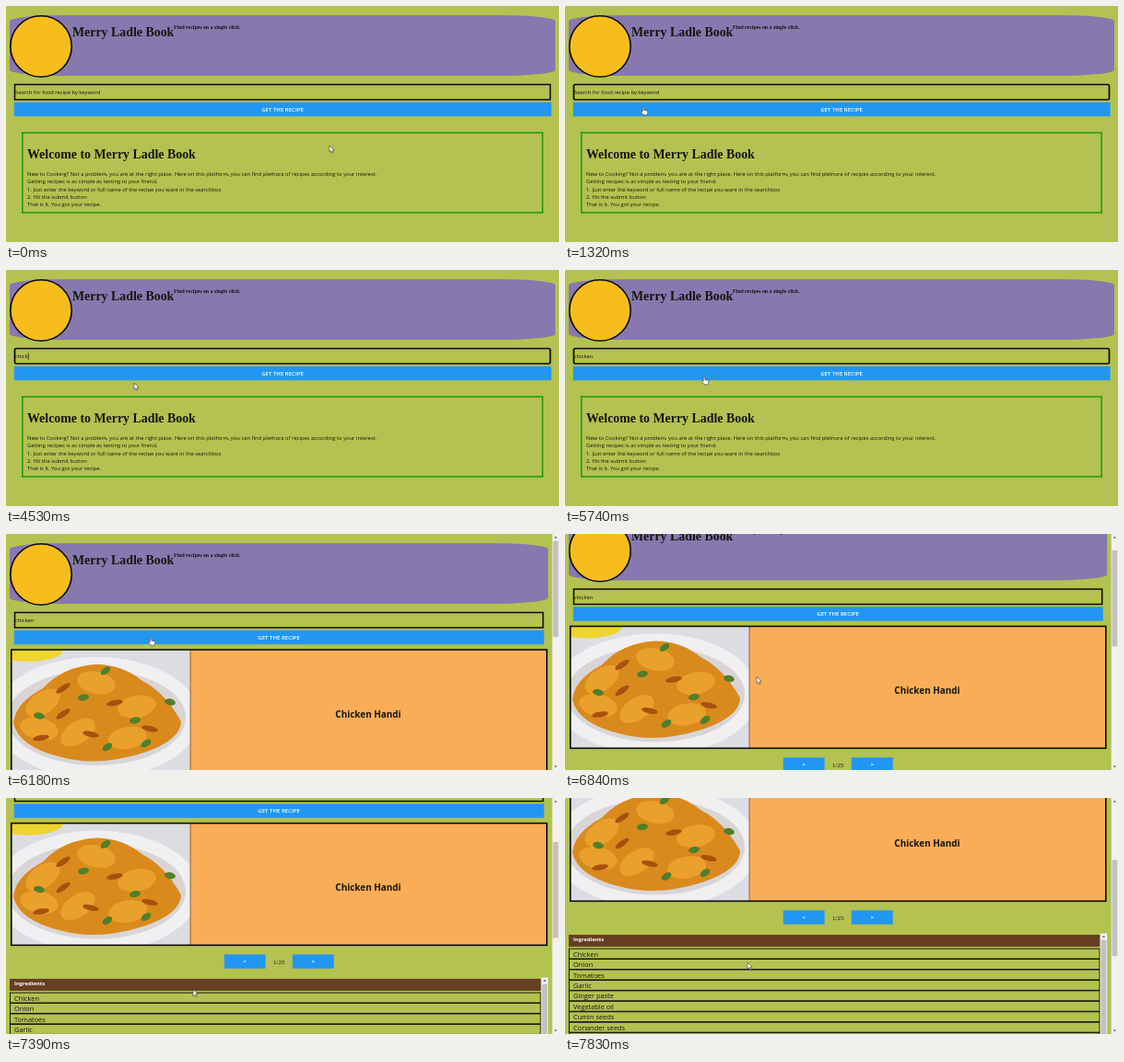
Write an HTML page that moves like this. It is 600 px wide and 257 px high and loops after 8 s.

```html
<!DOCTYPE html>
<html lang="en">
<head>
<meta charset="utf-8">
<title>Recipe search</title>
<style>
  html, body { margin: 0; width: 100%; height: 100%; overflow: hidden; background: #b3c250; }
  svg { display: block; width: 100vw; height: 100vh; }
  text { font-family: "Open Sans", "Noto Sans", sans-serif; font-size: 5.83px; fill: #151510; white-space: pre; }
  .serif { font-family: "Liberation Serif", "Noto Serif", serif; }
  .bold { font-weight: 700; }
  .mid { text-anchor: middle; }
  .white { fill: #fff; }
  .btn { fill: #2196f3; stroke: #4d9fca; stroke-width: .6; }
  .line { fill: none; stroke: #0a0a08; }
</style>
</head>
<body>
<svg viewBox="0 0 600 257" preserveAspectRatio="none">
  <g id="page">
    <rect id="header" x="4" y="10" height="66" rx="59" ry="6.6" fill="#8878b0"/>
    <circle cx="38" cy="44" r="33.2" fill="#f6bd1c" stroke="#0a0a08" stroke-width="1.6"/>
    <text class="serif bold" x="72" y="32.5" style="font-size:13.9px">Merry Ladle Book</text>
    <text class="serif bold" x="182" y="25.2" style="font-size:5.84px">Find recipes on a single click.</text>

    <rect id="field" class="line" x="9.5" y="85.5" height="16.5"/>
    <text id="query" x="10" y="96.2"></text>
    <rect id="caret" y="90.3" width=".7" height="7.4" fill="#0a0a08"/>
    <rect id="submit" class="btn" x="9" y="105" height="15"/>
    <text id="label" class="mid white" y="114.8" style="font-size:6.05px;font-weight:600">GET THE RECIPE</text>

    <g id="welcome">
      <rect x="17.8" y="138" width="564.4" height="87" fill="none" stroke="#1d9612" stroke-width="1.5"/>
      <text class="serif bold" x="23" y="165.5" style="font-size:13.9px">Welcome to Merry Ladle Book</text>
    </g>

    <g id="results">
      <rect x="5.8" y="126" width="581" height="132.8" fill="#faad58"/>
      <svg x="6" y="126" width="194" height="132.5" viewBox="6 126 194 132.5">
        <rect x="6" y="126" width="194" height="133" fill="#dcdde2"/>
        <ellipse cx="24" cy="126" rx="38" ry="13" fill="#efd52f"/>
        <ellipse cx="98" cy="200" rx="112" ry="66" fill="#f0eff1"/>
        <ellipse cx="98" cy="200" rx="97" ry="52" fill="#d9d5d6"/>
        <path fill="#d98a1c" d="M8 206Q10 184 40 168Q62 144 98 142Q126 142 148 160Q172 172 190 204Q190 224 150 238Q100 254 60 243Q14 232 8 206Z"/>
        <g id="pieces" fill="#eaa12c"></g>
        <g id="sears" fill="#a9500f"></g>
        <g id="leaves" fill="#4f7f2c"></g>
      </svg>
      <path d="M200 126V259" stroke="#3c2a16" stroke-width=".6"/>
      <rect class="line" x="5.8" y="126" width="581" height="132.8" stroke-width="1.6"/>
      <text class="mid bold" x="393" y="199.6" style="font-size:9.93px">Chicken Handi</text>

      <rect class="btn" x="237" y="269" width="44.3" height="15"/>
      <rect class="btn" x="311" y="269" width="44.6" height="15"/>
      <text class="mid white bold" x="259" y="278.6">&lt;</text>
      <text class="mid white bold" x="333.5" y="278.6">&gt;</text>
      <text class="serif" x="290" y="279" style="font-size:7px">1/25</text>

      <rect x="4" y="295.4" width="576.5" height="13" fill="#653f20"/>
      <text class="white bold" x="9" y="302.9">Ingredients</text>
      <g id="rows"></g>
      <rect x="580.7" y="294" width="7.5" height="130" fill="#f1f1f1"/>
      <rect x="581.6" y="301" width="5.7" height="123" fill="#c1c1c1"/>
      <path d="M582.8 298.2h3.4l-1.7-2z" fill="#555"/>
    </g>
  </g>

  <g id="bar">
    <rect x="592.7" width="7.3" height="257" fill="#f1f1f1"/>
    <rect id="thumb" x="593.5" width="5.8" height="104.5" fill="#c1c1c1"/>
    <path d="M594.8 4.6h3.2l-1.6-2zM594.8 252.6h3.2l-1.6 2z" fill="#555"/>
  </g>

  <g id="mouse">
    <path id="arrow" d="M0 0V7.2L1.7 5.7L2.8 8.2L4 7.7L2.9 5.2H5.2Z" fill="#fff" stroke="#333" stroke-width=".6"/>
    <path id="hand" d="M-.8 .6Q0-.4.8.6V3.4L4.4 4.2Q5 4.6 4.7 6.2L4 8.8H.2L-2.6 5.4Q-2.4 4.3-.8 5.2Z" fill="#fff" stroke="#333" stroke-width=".6"/>
    <path id="beam" d="M-1.4-3.6H1.4M0-3.6V3.6M-1.4 3.6H1.4" fill="none" stroke="#222" stroke-width=".7"/>
  </g>
</svg>
<script>
const LOOP = 8000, STEP = 110, REST = 1320, RESUME = 2440;
const FOCUS = 990, BLUR = 5850, RESULTS = 6070;
const KEYS = [3540, 3760, 4090, 4200, 4420, 4750, 4860];
const SCROLL = [[6620, 0], [6840, 25.5], [7390, 98.5], [7830, 146.5]];
const MOUSE = [
  [0, 351, 152], [880, 84, 93], [1210, 84, 93], [1320, 85, 110],
  [2330, 85, 110], [2550, 139, 123], [5520, 139, 123], [5850, 157, 112.5],
  [6400, 157, 112.5], [6730, 208, 155.5], [6840, 208, 155.5], [7390, 203, 208.5], [7830, 198, 179]
];
const INTRO = [
  "New to Cooking? Not a problem, you are at the right place. Here on this platform, you can find plethora of recipes according to your interest.",
  "Getting recipes is as simple as texting to your friend.",
  "1. Just enter the keyword or full name of the recipe you want in the searchbox",
  "2. Hit the submit button",
  "That is it. You got your recipe."
];
const FOODS = ["Chicken", "Onion", "Tomatoes", "Garlic", "Ginger paste", "Vegetable oil", "Cumin seeds", "Coriander seeds", ""];

const $ = id => document.getElementById(id);
const set = (id, attrs) => { for (const k in attrs) $(id).setAttribute(k, attrs[k]); };
const show = (id, on) => { $(id).style.display = on ? "" : "none"; };

function add(parent, tag, attrs, text = "") {
  const el = document.createElementNS("http://www.w3.org/2000/svg", tag);
  for (const k in attrs) el.setAttribute(k, attrs[k]);
  el.textContent = text;
  $(parent).append(el);
}

function track(points, t) {
  const i = points.findIndex(p => p[0] > t);
  if (i === 0) return points[0].slice(1);
  if (i < 0) return points[points.length - 1].slice(1);
  const a = points[i - 1], b = points[i], k = (t - a[0]) / (b[0] - a[0]);
  return a.slice(1).map((v, j) => v + (b[j + 1] - v) * k);
}

function blobs(id, rx, ry, points) {
  points.forEach(([x, y], i) => add(id, "ellipse", {
    cx: x, cy: y, rx, ry, transform: `rotate(${i * 47 % 70 - 35} ${x} ${y})`
  }));
}

INTRO.forEach((s, i) => add("welcome", "text", { x: 23, y: 185.2 + i * 8.25 }, s));
FOODS.forEach((s, i) => {
  const y = 310.6 + i * 11.45;
  add("rows", "rect", { class: "line", x: 4.5, y, width: 575.5, height: 10.9, "stroke-width": .9 });
  add("rows", "text", { x: 9, y: y + 8.5, style: "font-size:7.4px" }, s);
});
blobs("pieces", 21, 12, [[40, 184], [98, 162], [142, 188], [78, 216], [36, 212], [132, 222]]);
blobs("sears", 9, 3, [[62, 196], [92, 218], [118, 184], [62, 168], [156, 212], [38, 222]]);
blobs("leaves", 6, 3.5, [[108, 149], [36, 198], [140, 203], [110, 232], [178, 183], [84, 178], [152, 228]]);

function snap(t) {
  if (t < RESUME) return Math.min(REST, Math.floor(t / STEP) * STEP);
  return Math.min(7830, RESUME + Math.floor((t - RESUME) / STEP) * STEP);
}

function draw(time) {
  const t = snap(time);
  const found = t >= RESULTS, focused = t >= FOCUS && t < BLUR;
  const inset = found ? 7.8 : 0;
  const [scroll] = track(SCROLL, t);
  const [mx, my] = track(MOUSE, t);

  set("page", { transform: `translate(0 ${-scroll})` });
  set("header", { width: 592 - inset });
  set("field", { width: 581 - inset, rx: focused ? 1.6 : 0, "stroke-width": focused ? 1.7 : 1.5 });
  set("submit", { width: 582.5 - inset });
  set("label", { x: 300 - inset / 2 });
  show("welcome", !found);
  show("results", found);
  show("bar", found);
  set("thumb", { y: 7.5 + scroll * .41 });

  const typed = KEYS.filter(k => k <= t).length;
  const query = $("query");
  query.textContent = typed ? "chicken".slice(0, typed) : "Search for food recipe by keyword";
  const since = t - KEYS[typed - 1];
  show("caret", typed && focused && since % 1060 < 530);
  if (typed) set("caret", { x: 10.2 + query.getComputedTextLength() });

  const y = my + scroll, inside = mx > 9 && mx < 591 - inset;
  const overField = inside && y > 85 && y < 102.5;
  const overButton = inside && y > 104.5 && y < 120.5;
  set("mouse", { transform: `translate(${mx} ${my})` });
  show("beam", overField);
  show("hand", overButton);
  show("arrow", !overField && !overButton);
}

const start = performance.now();
function tick() {
  draw((performance.now() - start) % LOOP);
  requestAnimationFrame(tick);
}
tick();
</script>
</body>
</html>
```
